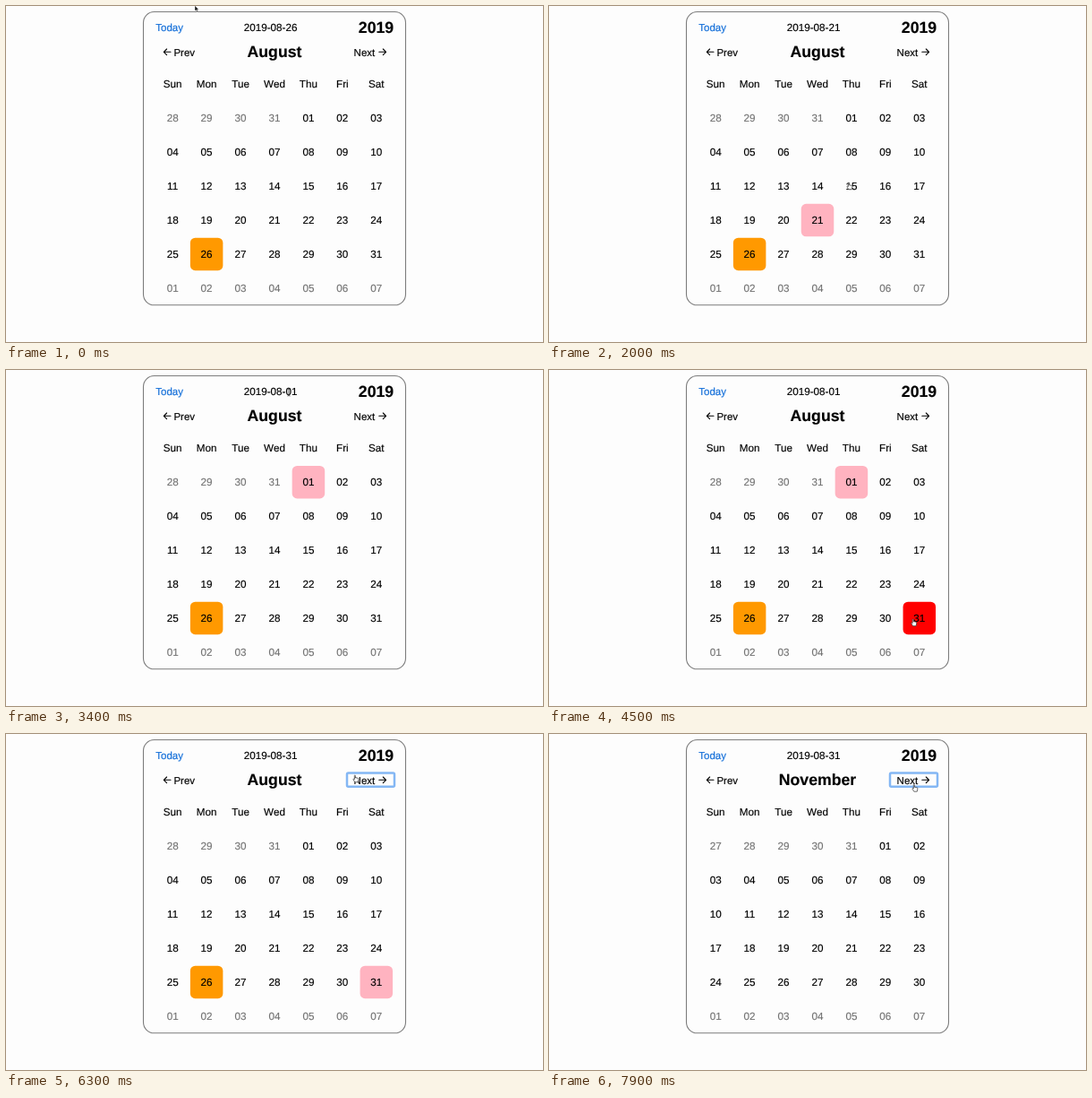
An HTML page that plays this animation: 600 by 375 pixels, repeating every 8000 ms.

```html
<!DOCTYPE html>
<html lang="en">
<head>
<meta charset="utf-8">
<title>Calendar</title>
<style>
  html, body { margin: 0; width: 100%; height: 100%; overflow: hidden; background: #fdfdfd; }
  svg { display: block; width: 100vw; height: 100vh; }
  text {
    font: 11.7px "Liberation Sans", Arial, sans-serif;
    text-rendering: geometricPrecision;
    color: #000; fill: currentColor; stroke: currentColor; stroke-width: .15;
  }
  .mid { text-anchor: middle; }
  .nav { font-size: 11.5px; }
  .big { font-size: 17.7px; font-weight: bold; }
  .link { color: #0f6cd8; }
  .out { color: #737373; }
  .card { fill: none; stroke: #7d7d7d; stroke-width: 1.1; }
  .arrow { fill: none; stroke: #000; stroke-width: 1.1; stroke-linecap: round; stroke-linejoin: round; }
  .ring { fill: none; stroke: #84b7f4; stroke-width: 2.5; }
  .box { fill: none; }
  .today { fill: #f90; }
  .hover { fill: #f00; }
  .picked { fill: #ffb3c0; }
  .hand { fill: #fff; stroke: #333; stroke-width: .8; stroke-linejoin: round; }
  .pointer { fill: #111; stroke: #fff; stroke-width: .4; }
  .beam { fill: none; stroke: #333; stroke-width: .8; }
</style>
</head>
<body>
<svg viewBox="0 0 600 375">
  <rect class="card" x="153.5" y="6.5" width="293" height="327.3" rx="12"/>
  <text class="link nav" x="167.3" y="28.4">Today</text>
  <text class="mid" id="date" x="295.6" y="27.7"></text>
  <text class="big" x="433.2" y="29.6" text-anchor="end">2019</text>
  <path class="arrow" d="M184 51.3H176.3M179.6 48L176.3 51.3L179.6 54.6"/>
  <text class="nav" x="187.4" y="55.5">Prev</text>
  <text class="big mid" id="month" x="300" y="57.3"></text>
  <text class="nav" x="388.6" y="55.5">Next</text>
  <path class="arrow" d="M416.8 51.3H424.6M421.3 48L424.6 51.3L421.3 54.6"/>
  <rect class="ring" id="ring" x="381" y="43.6" width="53" height="15.2" rx="1.5"/>
  <g id="grid"></g>
  <g id="cursor">
    <path class="hand" transform="scale(.88)" d="M-1.9 -4C-1.9 -4.8 -.7 -4.8 -.7 -4V-1.4L2.4 -.9Q3.4 -.6 3.3 .5L2.6 4.2H-1.4L-3.4 .9Q-3.5 -.2 -2.6 0L-1.9 .7Z"/>
    <path class="pointer" d="M-2 -3.5V2.6L-.6 1.4L.4 3.6L1.4 3.1L.5 1H2.3Z"/>
    <path class="beam" d="M-1.5 -4Q0 -4 0 -3Q0 -4 1.5 -4M0 -3V3M-1.5 4Q0 4 0 3Q0 4 1.5 4"/>
  </g>
</svg>
<script>
const LOOP = 8000, STEP = 100, PITCH = 37.94;
const YEAR = 2019, AUGUST = 7, TODAY = 26;
const CLICK_LEAD = 300; // a day is clicked this long before the cursor leaves it
const FOCUS_AT = 6300, NEXT_CLICKS = [6400, 7500, 7700];

const $ = id => document.getElementById(id);
const pad = n => String(n).padStart(2, "0");
const colX = i => 300 + PITCH * (i - 3);
const rowY = i => 125.2 + PITCH * i;
const leadOf = month => new Date(YEAR, month, 1).getDay();

const stop = (arrive, leave, x, y) => ({ arrive, leave, x, y });
const readDate = (arrive, leave) => stop(arrive, leave, 316, 25);

function visit(arrive, leave, day, dx = 0, dy = 0) {
  const i = day - 1 + leadOf(AUGUST);
  return { ...stop(arrive, leave, colX(i % 7) + dx, rowY(Math.floor(i / 7)) + dy), day };
}

const STOPS = [
  stop(0, 0, 213, 3),
  stop(100, 200, 297, 32),
  visit(700, 800, TODAY, 2, 4),
  visit(1100, 1600, 21, 3, -8),
  readDate(1800, 1800),
  visit(2000, 2200, 15, -2),
  visit(2500, 3000, 1),
  readDate(3200, 3400),
  visit(4000, 5000, 31, -6, 5),
  readDate(5400, 5800),
  stop(6100, 6600, 391, 50),
  stop(7000, 7000, 408, 88),
  stop(7300, LOOP, 409, 60.5)
];
// Days that get clicked; the others are only passed over
const PICKS = STOPS.filter(s => s.leave - s.arrive > CLICK_LEAD && s.day);

function add(tag, attrs, label = "") {
  const el = document.createElementNS("http://www.w3.org/2000/svg", tag);
  for (const key in attrs) el.setAttribute(key, attrs[key]);
  el.textContent = label;
  $("grid").append(el);
  return el;
}

["Sun", "Mon", "Tue", "Wed", "Thu", "Fri", "Sat"].forEach((day, i) =>
  add("text", { class: "mid", x: colX(i), y: 91.3 }, day));

const cells = Array.from({ length: 42 }, (_, i) => {
  const x = colX(i % 7), y = rowY(Math.floor(i / 7));
  return {
    box: add("rect", { x: x - 18.25, y: y - 18.25, width: 36.5, height: 36.5, rx: 5.5 }),
    label: add("text", { x, y: y + 4.1 })
  };
});

function cursorAt(t) {
  const i = Math.max(0, STOPS.findLastIndex(s => s.arrive <= t));
  const a = STOPS[i], b = STOPS[i + 1] ?? a;
  if (t <= a.leave) return [a.x, a.y];
  const p = (t - a.leave) / (b.arrive - a.leave), ease = p * p * (3 - 2 * p);
  return [a.x + (b.x - a.x) * ease, a.y + (b.y - a.y) * ease];
}

function cellAt(t) {
  const [x, y] = cursorAt(t);
  const col = Math.round((x - colX(0)) / PITCH), row = Math.round((y - rowY(0)) / PITCH);
  return col < 0 || col > 6 || row < 0 || row > 5 ? -1 : row * 7 + col;
}

function cursorKind(t, x, y) {
  const onNext = x > 380 && x < 435 && y > 42 && y < 64;
  if (onNext || cellAt(t) >= 0) return 0;
  return x > 264 && x < 327 && y < 30 ? 2 : 1;
}

function drawGrid(t) {
  const month = AUGUST + NEXT_CLICKS.filter(c => c <= t).length;
  const pick = PICKS.findLast(s => s.leave - CLICK_LEAD <= t)?.day ?? TODAY;
  // The highlight needs the cursor to rest on a day for one step
  const over = cellAt(t) === cellAt(t - STEP) ? cellAt(t) : -1;
  cells.forEach(({ box, label }, i) => {
    const date = new Date(YEAR, month, 1 - leadOf(month) + i), day = date.getDate();
    const inside = date.getMonth() === month, august = inside && month === AUGUST;
    label.textContent = pad(day);
    label.setAttribute("class", inside ? "mid" : "mid out");
    box.setAttribute("class",
      august && day === TODAY ? "today" :
      august && day === pick ? "picked" :
      i === over ? "hover" : "box");
  });
  $("month").textContent = new Date(YEAR, month, 1).toLocaleString("en", { month: "long" });
  $("date").textContent = `${YEAR}-${pad(AUGUST + 1)}-${pad(pick)}`;
}

function draw(t) {
  drawGrid(t);
  $("ring").style.display = t >= FOCUS_AT ? "" : "none";
  const [x, y] = cursorAt(t), kind = cursorKind(t, x, y);
  $("cursor").setAttribute("transform", `translate(${x} ${y})`);
  [...$("cursor").children].forEach((el, i) => el.style.display = i === kind ? "" : "none");
}

let start, last = -1;
function tick(now) {
  start ??= now;
  const t = Math.floor((now - start) % LOOP / STEP) * STEP;
  if (t !== last) draw(last = t);
  requestAnimationFrame(tick);
}
draw(0);
requestAnimationFrame(tick);
</script>
</body>
</html>
```
